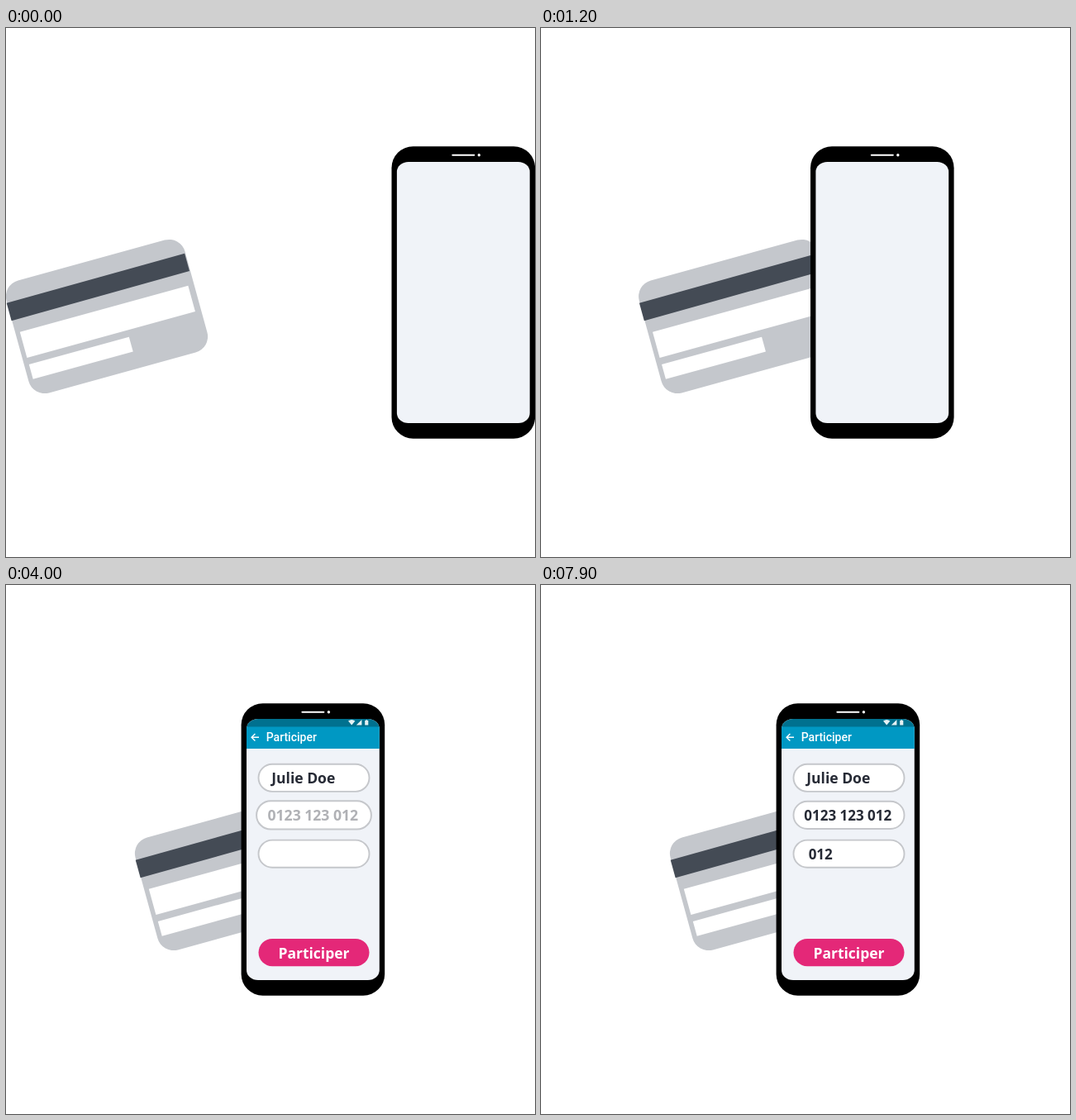
These frames come from a looping animation (640x640 px, 8000 ms). An HTML page:

```html
<!DOCTYPE html>
<html lang="fr">
<head>
<meta charset="utf-8">
<style>
  html, body { margin: 0; width: 100%; height: 100%; overflow: hidden; background: #fff; }
  svg { display: block; width: 100vw; height: 100vh; }
  text { font: 700 17px "Open Sans", sans-serif; fill: #262a35; text-anchor: middle; }
  .word { font-size: 17.5px; }
  .title { font: 500 14px Roboto, sans-serif; fill: #fff; text-anchor: start; }
  .field { fill: #fff; stroke: #c5c7cb; stroke-width: 1.9; }
</style>
</head>
<body>
<svg viewBox="0 0 640 640">
  <defs>
    <clipPath id="screen"><rect x="291" y="162" width="160.8" height="316" rx="14" ry="12"/></clipPath>
    <rect id="pill" x="-67" y="-16.6" width="134" height="33.2" rx="16.6"/>
  </defs>

  <g id="card">
    <g transform="translate(278 349) rotate(-15.4)">
      <rect x="-112" y="-70.5" width="224" height="141" rx="20" fill="#c4c7cc"/>
      <path d="M-112.6-47.9L111-48.6V-26.4L-112.6-25.6Z" fill="#444b55"/>
      <path d="M-106.4-9.8H104.7V22.5H-106.4ZM-106.2 30.9H19.3V49.4H-106.2Z" fill="#fff"/>
    </g>
  </g>

  <g id="phone">
    <rect x="284.6" y="143.2" width="173.6" height="353.5" rx="26"/>
    <rect x="291" y="162" width="160.8" height="316" rx="14" ry="12" fill="#f0f3f8"/>
    <path d="M358.4 153.7H384.4" stroke="#fff" stroke-width="2" stroke-linecap="round"/>
    <circle cx="390.4" cy="153.8" r="1.7" fill="#fff"/>

    <g id="app" opacity="0">
      <g clip-path="url(#screen)">
        <path d="M290 161H453V172H290Z" fill="#00718f"/>
        <path d="M290 171.6H453V198H290Z" fill="#0098c3"/>
      </g>
      <path d="M414 164.6Q418.2 161.6 422.4 164.6L418.2 169.6ZM423.8 169.5L430.4 163V169.5ZM434.2 164H435.3V163.2H437.2V164H438.3V169.6H434.2Z" fill="#fff" fill-opacity=".9"/>
      <path d="M306 184.2H297.2M301.4 179.9L297.1 184.2L301.4 188.5" fill="none" stroke="#fff" stroke-width="1.4"/>
      <text class="title" x="314.7" y="188.8">Participer</text>

      <use href="#pill" class="field" x="372.5" y="233.3"/>
      <text class="word" x="359.8" y="239.8">Julie Doe</text>

      <g id="numberBox"><use href="#pill" class="field"/></g>
      <g id="numberText"><text y="6.4">0123 123 012</text></g>
      <g id="codeBox"><use href="#pill" class="field"/></g>
      <g id="codeText"><text y="6.4">012</text></g>

      <g id="button">
        <use href="#pill" fill="#e42878"/>
        <text class="word" y="7" style="fill:#fff">Participer</text>
      </g>
    </g>
  </g>
</svg>
<script>
  const LOOP = 8000, STEP = 100;
  const $ = id => document.getElementById(id);
  const progress = (t, from, to) => Math.min(1, Math.max(0, (t - from) / (to - from)));
  const sine = u => (1 - Math.cos(Math.PI * u)) / 2;
  const cubic = u => u < .5 ? 4 * u ** 3 : 1 - 4 * (1 - u) ** 3;

  const slide = (id, x) => $(id).setAttribute('transform', `translate(${x} 0)`);
  const place = (id, x, y, scale) =>
    $(id).setAttribute('transform', `translate(${x} ${y}) scale(${scale})`);

  // Field swells while its text appears, then settles back.
  function fill(name, t, start, textX, y) {
    const rise = progress(t, start, start + 300);
    const scale = 1 + .1 * (rise - progress(t, start + 500, start + 800));
    place(name + 'Box', 372.5, y, scale);
    place(name + 'Text', textX, y, scale);
    $(name + 'Text').setAttribute('opacity', rise);
  }

  function draw(t) {
    slide('phone', 181.9 * (1 - cubic(progress(t, 0, 1950))));
    slide('card', -156 * (1 - cubic(progress(t, 40, 1950))));
    $('app').setAttribute('opacity', sine(progress(t, 2000, 3010)));
    fill('number', t, 3892, 371.3, 278.4);
    fill('code', t, 5150, 338.2, 325.2);
    const press = sine(progress(t, 6720, 7200)) - sine(progress(t, 7320, 7850));
    place('button', 372.5, 444.6, 1 - .1 * press);
  }

  const began = performance.now();
  function tick() {
    const t = (performance.now() - began) % LOOP;
    draw(Math.floor(t / STEP) * STEP);
    requestAnimationFrame(tick);
  }
  tick();
</script>
</body>
</html>
```
